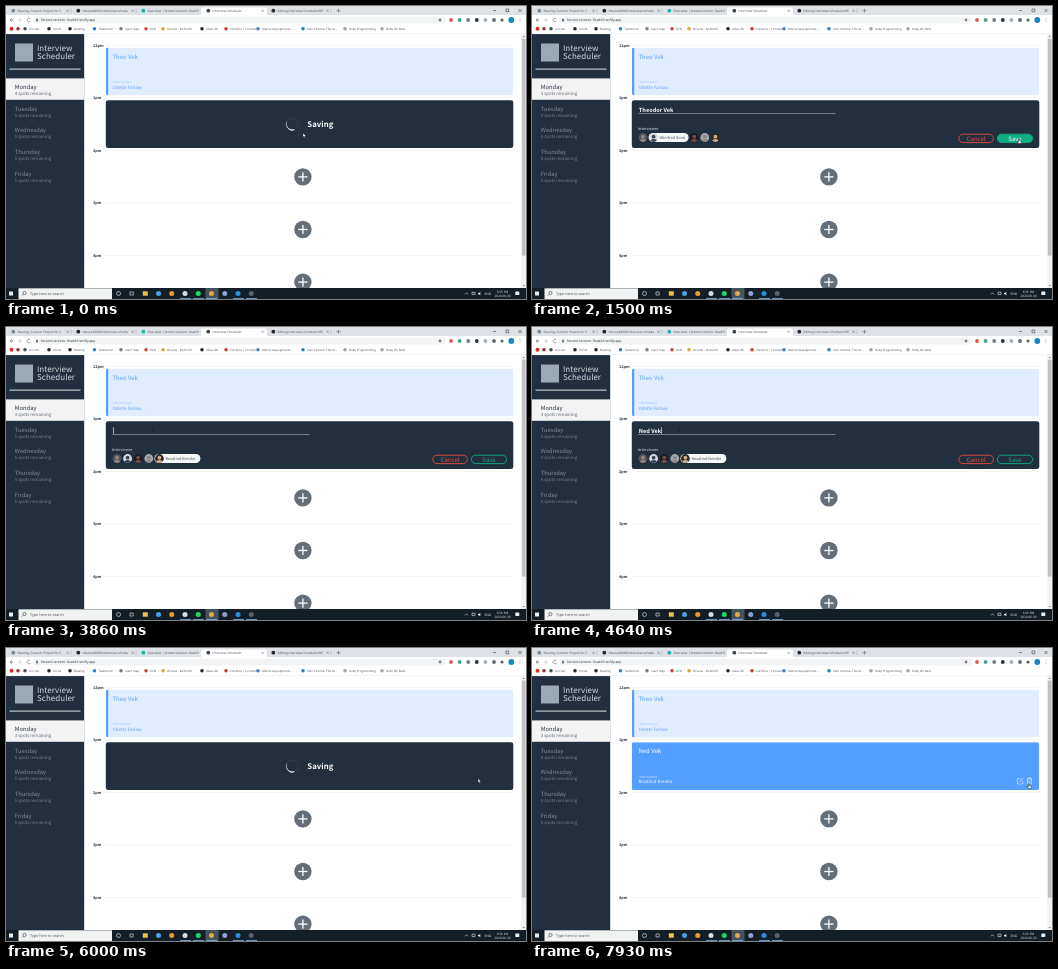
Recreate the animation shown at these times as an HTML page with a canvas. Size 520 px wide and 293 px high, loop 8000 ms.

```html
<!DOCTYPE html>
<html lang="en">
<head>
<meta charset="utf-8">
<title>Interview Scheduler</title>
<style>
html, body { margin: 0; width: 100%; height: 100%; overflow: hidden; background: #fff; }
canvas { display: block; width: 520px; height: 293px; }
</style>
</head>
<body>
<canvas id="stage"></canvas>
<script>
const W = 520, H = 293, LOOP = 8000;
const canvas = document.getElementById('stage');
const c = canvas.getContext('2d');
const dpr = window.devicePixelRatio || 1;
canvas.width = Math.round(W * dpr);
canvas.height = Math.round(H * dpr);

const APP = '"Noto Sans CJK JP", "Noto Sans CJK SC", "Noto Sans CJK", "Open Sans", sans-serif';
const UI = '"Open Sans", "Noto Sans", sans-serif';
const NAVY = '#222f3e', BLUE = '#539fff', RED = '#e74c3c', GREEN = '#10ac84';
const CARD = { x: 99.8, w: 407.5, h: 47.9, r: 2.4 };

const FIRST = 'Theo Vek', OLD = 'Theodor Vek', NEW = 'Ned Vek';
const PEOPLE = [
  { skin: '#9a8478', back: '#4d5661' },
  { skin: '#39424e', back: '#d9dde2', name: 'Winifred Soral' },
  { skin: '#7d4a42', back: '#171c24' },
  { skin: '#8d8580', back: '#a3a8ae' },
  { skin: '#cfae88', back: '#2c2926', name: 'Rosalind Brenko' }
];

// Times of the state changes, in ms
const T = { saved: 70, edit: 1500, pick: 2430, focus: 2720, erase: 2930, erased: 3500, save: 5930, done: 7070 };
const KEYS = [3930, 4140, 4290, 4360, 4430, 4500, 4570];
// Pointer path: time, x, y
const PATH = [
  [0, 297, 127], [640, 297, 127], [1000, 476, 131], [1290, 487, 133], [1680, 487, 133],
  [2340, 183, 131], [2460, 183, 131], [2710, 147, 102], [5000, 147, 102],
  [5640, 472, 130.5], [7360, 472, 130.5], [7860, 497, 136], [8000, 497, 136]
];

function rect(x, y, w, h, fill) {
  c.fillStyle = fill;
  c.fillRect(x, y, w, h);
}

function round(x, y, w, h, r, fill, stroke, lw = 0.7) {
  c.beginPath();
  c.roundRect(x, y, w, h, r);
  if (fill) { c.fillStyle = fill; c.fill(); }
  if (stroke) { c.strokeStyle = stroke; c.lineWidth = lw; c.stroke(); }
}

function dot(x, y, r, fill) {
  c.beginPath();
  c.arc(x, y, r, 0, Math.PI * 2);
  c.fillStyle = fill;
  c.fill();
}

function line(color, lw, ...p) {
  c.beginPath();
  for (let i = 0; i < p.length; i += 2) c.lineTo(p[i], p[i + 1]);
  c.strokeStyle = color;
  c.lineWidth = lw;
  c.stroke();
}

function poly(fill, stroke, ...p) {
  c.beginPath();
  for (let i = 0; i < p.length; i += 2) c.lineTo(p[i], p[i + 1]);
  c.closePath();
  c.fillStyle = fill;
  c.fill();
  if (stroke) { c.strokeStyle = stroke; c.lineWidth = 0.5; c.stroke(); }
}

// Small type is laid out large and scaled down, so its spacing is not rounded to pixels.
const ZOOM = 10;
function text(s, x, y, size, color, weight = 400, family = APP, align = 'left') {
  c.save();
  c.translate(x, y);
  c.scale(1 / ZOOM, 1 / ZOOM);
  c.font = `${weight} ${size * ZOOM}px ${family}`;
  c.textRendering = 'geometricPrecision';
  c.textAlign = align;
  c.fillStyle = color;
  c.fillText(s, 0, 0);
  const width = c.measureText(s).width / ZOOM;
  c.restore();
  return width;
}

const ui = (s, x, y, size, color) => text(s, x, y, size, color, 400, UI);

function drawBrowser() {
  rect(0, 0, W, 9, '#dee1e6');
  rect(0, 9, W, 19, '#fff');
  round(195, 1.5, 66, 9, [2, 2, 0, 0], '#fff');
  const tabs = [
    ['Bearing, Custom Project for S', '#7b8794'], ['theovek0000/interview-schedu', '#24292e'],
    ['Overview | fervent-lantern-1bad', '#20b2aa'], ['Interview Scheduler', '#3b4654'],
    ['Editing Interview-Scheduler/RE', '#24292e']
  ];
  tabs.forEach(([title, color], i) => {
    const x = 5 + i * 65;
    dot(x + 2.3, 4.7, 1.9, color);
    ui(title, x + 6.5, 5.9, 3.2, '#4a4e53');
    line('#5f6368', 0.5, x + 55.5, 3.6, x + 57.7, 5.8);
    line('#5f6368', 0.5, x + 57.7, 3.6, x + 55.5, 5.8);
    if (i !== 2 && i !== 3) line('#a5a9ae', 0.5, x + 60, 2.5, x + 60, 7);
  });
  line('#5f6368', 0.6, 330.5, 4.7, 334.5, 4.7);
  line('#5f6368', 0.6, 332.5, 2.7, 332.5, 6.7);
  line('#222', 0.5, 487, 4.5, 490, 4.5);
  c.strokeRect(500, 3, 2.8, 2.8);
  line('#222', 0.5, 512.5, 3, 515.5, 6);
  line('#222', 0.5, 515.5, 3, 512.5, 6);

  line('#5f6368', 0.6, 6, 12.2, 4, 14, 6, 15.8);
  line('#5f6368', 0.6, 4, 14, 7.5, 14);
  line('#b5b8bc', 0.6, 13.5, 12.2, 15.5, 14, 13.5, 15.8);
  line('#b5b8bc', 0.6, 12, 14, 15.5, 14);
  c.beginPath();
  c.arc(23, 14, 1.8, 0.4, 5.6);
  c.strokeStyle = '#5f6368';
  c.stroke();
  round(27, 10.6, 413, 6.8, 3.4, '#f1f3f4');
  rect(30, 13.5, 2, 1.8, '#5f6368');
  c.beginPath();
  c.arc(31, 13.5, 0.8, Math.PI, 0);
  c.stroke();
  ui('fervent-lantern-1bad4f.netlify.app', 35, 15.2, 3.45, '#303438');
  dot(434, 14, 1.4, '#7a7f85');
  ['#e2574c', '#43a389', '#6d7b88', '#2c3338', '#a8adb3', '#5b6770'].forEach((k, i) =>
    dot(445 + i * 8.6, 14, 1.9, k));
  dot(496, 14, 1.6, '#5f6368');
  dot(505.3, 14, 2.9, '#1787c0');
  for (const y of [12.4, 14, 15.6]) dot(514, y, 0.4, '#5f6368');

  dot(5.5, 22.7, 2, '#d93025');
  dot(12, 22.7, 1.8, '#9b2f36');
  const marks = [
    [19, 'visr.net', '#4a4f55'], [43, 'Forvik', '#24292e'], [64, 'Bearing', '#24292e'],
    [88.5, 'TaskVorrel', '#2f80d0'], [115, 'react map', '#7a8088'], [140, 'KVD', '#d0453e'],
    [157, 'Orvane - KodruHil', '#e2a035'], [196, 'Ideas db', '#24292e'],
    [220, 'Zundora | Connect', '#cf3b35'], [252, 'Melvornequipments...', '#4d7fc4'],
    [297, 'Velo Cinema: The Ar...', '#2b82b5'], [339, 'Ruby Programming', '#a0a5ab'],
    [376, 'Ruby On Rails', '#a0a5ab']
  ];
  for (const [x, s, k] of marks) {
    dot(x, 22.7, 1.8, k);
    ui(s, x + 4, 23.8, 3, '#4a4e53');
  }
  line('#e4e6e8', 0.5, 0, 27.7, W, 27.7);
}

function drawScrollbar() {
  rect(515.4, 28, 4.6, 254, '#f1f1f1');
  rect(515.8, 32.6, 3.8, 217, '#c1c1c1');
  poly('#606468', null, 516.7, 30.9, 518.7, 30.9, 517.7, 29.7);
  poly('#606468', null, 516.7, 279, 518.7, 279, 517.7, 280.2);
}

function drawTaskbar() {
  rect(0, 282, W, 11, '#141e27');
  rect(12.5, 282.3, 93.5, 10.7, '#f1f2f2');
  rect(3, 285.5, 4, 4, '#e8edf0');
  c.beginPath();
  c.arc(18.5, 287, 1.6, 0, 7);
  c.strokeStyle = '#333a40';
  c.lineWidth = 0.6;
  c.stroke();
  line('#333a40', 0.6, 17.3, 288.2, 16, 289.6);
  ui('Type here to search', 24, 288.8, 3.7, '#4a4f54');
  c.beginPath();
  c.arc(112.5, 287.5, 2, 0, 7);
  c.strokeStyle = '#e8edf0';
  c.stroke();
  c.strokeRect(124, 286, 3.2, 3);
  rect(199.5, 282, 13, 11, '#46525c');
  rect(136.8, 285.3, 5, 4.4, '#f0c04c');
  ['#4c9fe0', '#e89b35', '#d9dde0', '#1ed760', '#e0a84a', '#8f9fd6', '#2790e0', '#59626b'].forEach((k, i) =>
    dot(152.5 + i * 13.25, 287.5, 2.5, k));
  for (const x of [174, 187, 200, 227, 240]) rect(x, 292.2, 11, 0.8, '#76b9ed');
  line('#e8edf0', 0.6, 459, 288.3, 460.5, 286.8, 462, 288.3);
  c.strokeRect(466, 286.2, 3, 2.4);
  poly('#e8edf0', null, 472, 287, 473, 287, 474.3, 285.8, 474.3, 289.2, 473, 288.2, 472, 288.2);
  ui('ENG', 478.5, 288.7, 3.3, '#e8edf0');
  text('6:56 PM', 496.5, 286.6, 3.1, '#e8edf0', 400, UI, 'center');
  text('2020-06-30', 496.5, 291.2, 3.1, '#e8edf0', 400, UI, 'center');
  round(509.3, 285.6, 4, 3.4, 0.4, '#e8edf0');
}

function drawSidebar(spots) {
  rect(0, 28, 78.3, 254, NAVY);
  rect(78.3, 28, 0.7, 254, '#dfe2e5');
  rect(9, 37.5, 18, 18, '#9aa9b8');
  text('Interview', 31, 45.3, 8.05, '#d3d9df', 300);
  text('Scheduler', 31, 53.1, 8.05, '#d3d9df', 300);
  rect(3.5, 62.6, 71, 1, '#dfe3e7');
  rect(0, 72.4, 78.3, 21.4, '#f4f3f4');
  ['Monday', 'Tuesday', 'Wednesday', 'Thursday', 'Friday'].forEach((day, i) => {
    const y = 82.7 + i * 21.8;
    text(day, 8.8, y, 5.8, i ? '#848d98' : NAVY);
    text(`${i ? 5 : spots} spots remaining`, 8.8, y + 6, 4.4, i ? '#7a838f' : '#5d6670');
  });
}

function drawHours() {
  ['12pm', '1pm', '2pm', '3pm', '4pm'].forEach((hour, i) => {
    const y = 39.2 + i * 52.6;
    text(hour, 87, y + 1.4, 3.8, NAVY, 700);
    rect(100, y - 0.3, 407, 0.6, '#ececee');
    if (i < 2) return;
    const cy = y + 26.5;
    dot(296.9, cy, 8.7, '#636e78');
    line('#fff', 1.3, 292.3, cy, 301.5, cy);
    line('#fff', 1.3, 296.9, cy - 4.6, 296.9, cy + 4.6);
  });
}

function drawCard(y, name, person, hover) {
  const { x, w, h, r } = CARD;
  c.save();
  c.beginPath();
  c.roundRect(x, y, w, h, r);
  c.clip();
  rect(x, y, w, h, hover ? BLUE : '#e0edff');
  rect(x, y, 2.4, h, BLUE);
  c.restore();
  const ink = hover ? '#fff' : '#5ba2fb';
  text(name, 106.4, y + 11.2, 6, ink);
  text('Interviewer', 106.6, y + 35.6, 3.5, hover ? '#cfe3ff' : '#9cc6fb');
  text(person, 106.5, y + 41.2, 4.45, ink);
  if (!hover) return;
  c.lineJoin = 'round';
  line('#e9f2ff', 0.6, 488.5, 130.6, 485.4, 130.6, 485.4, 136, 490.8, 136, 490.8, 133.4);
  line('#e9f2ff', 0.8, 487.6, 133.9, 491.4, 129.9);
  line('#e9f2ff', 0.6, 494.8, 130.7, 500, 130.7);
  line('#e9f2ff', 0.6, 496.4, 130.5, 496.4, 129.7, 498.4, 129.7, 498.4, 130.5);
  line('#e9f2ff', 0.6, 495.4, 130.9, 495.6, 136, 499.2, 136, 499.4, 130.9);
  line('#e9f2ff', 0.4, 496.8, 132, 496.8, 135);
  line('#e9f2ff', 0.4, 498, 132, 498, 135);
}

function drawAvatar(x, y, p) {
  c.save();
  c.beginPath();
  c.arc(x, y, 4.4, 0, 7);
  c.clip();
  rect(x - 5, y - 5, 10, 10, p.back);
  dot(x, y - 0.8, 1.9, p.skin);
  c.beginPath();
  c.ellipse(x, y + 4.4, 3.4, 2.8, 0, 0, 7);
  c.fill();
  c.restore();
}

function button(label, x, w, color, filled) {
  round(x, 128.2, w, 8.4, 4.2, filled ? color : null, color, 0.9);
  text(label, x + w / 2, 134.6, 6, filled ? '#fff' : color, 400, APP, 'center');
}

function drawForm(value, chosen, caret, hover) {
  const end = 106.8 + text(value, 106.8, 105.6, 5.6, '#fff', 700);
  if (caret) rect(end + 0.3, 100.2, 0.6, 6.6, '#fff');
  rect(106.4, 107.3, 197, 0.6, '#aab2bb');
  text('Interviewer', 106, 124.2, 3.8, '#e3e7ea');
  let x = 106;
  PEOPLE.forEach((p, i) => {
    const w = chosen === i ? (i === 1 ? 40 : 46) : 0;
    if (w) {
      round(x, 127, w, 9, 4.5, '#f7f8f9');
      text(p.name, x + 11, 133, 3.95, '#4a5563');
    }
    drawAvatar(x + 5, 131.5, p);
    x += (w || 10) + 0.6;
  });
  button('Cancel', 426.8, 34.6, RED, false);
  button('Save', 465.4, 35.2, GREEN, hover);
}

function drawSaving(t) {
  const a = 1.3 + (t % 1000) / 1000 * Math.PI * 2;
  c.lineCap = 'round';
  for (let i = 0; i < 12; i++) {
    c.beginPath();
    c.arc(286.3, 118, 6, a + i * 0.19, a + (i + 1) * 0.19);
    c.strokeStyle = `rgba(255,255,255,${0.9 - i * 0.05})`;
    c.lineWidth = 1.2 - i * 0.05;
    c.stroke();
  }
  c.lineCap = 'butt';
  c.beginPath();
  c.arc(286.3, 118, 6, 0, 7);
  c.strokeStyle = 'rgba(255,255,255,0.13)';
  c.lineWidth = 0.6;
  c.stroke();
  text('Saving', 301.3, 120.9, 7.8, '#fff', 700);
}

function pointerAt(t) {
  let i = 1;
  while (i < PATH.length - 1 && PATH[i][0] < t) i++;
  const [t0, x0, y0] = PATH[i - 1], [t1, x1, y1] = PATH[i];
  const u = Math.min(1, Math.max(0, (t - t0) / (t1 - t0)));
  const k = u * u * (3 - 2 * u);
  return [x0 + (x1 - x0) * k, y0 + (y1 - y0) * k];
}

function drawPointer(x, y, kind) {
  c.save();
  c.translate(x, y);
  if (kind === 'beam') {
    line('#0b1017', 0.5, 0, -2.5, 0, 2.5);
  } else if (kind === 'hand') {
    poly('#fff', '#222', -0.5, 0, 0.5, 0, 0.6, 1.8, 2.4, 2.3, 2.2, 4.6, -0.7, 4.6, -1.8, 2.7, -0.5, 2.9);
  } else {
    poly('#fff', '#222', 0, 0, 0, 4.2, 1, 3.3, 1.7, 4.8, 2.4, 4.5, 1.8, 3, 3, 3);
  }
  c.restore();
}

function typed(t) {
  if (t < T.erase) return OLD;
  if (t < T.erased) {
    const gone = Math.floor((t - T.erase) / (T.erased - T.erase) * OLD.length) + 1;
    return OLD.slice(0, Math.max(0, OLD.length - gone));
  }
  return NEW.slice(0, KEYS.filter(k => k <= t).length);
}

function draw(t) {
  c.setTransform(dpr, 0, 0, dpr, 0, 0);
  rect(0, 0, W, H, '#fff');
  drawSidebar(t < T.saved ? 4 : 3);
  drawHours();
  drawCard(41.6, FIRST, 'Odette Farlow', false);

  const [x, y] = pointerAt(t);
  const inside = (l, r) => x >= l && x <= r && y >= 127 && y <= 137;
  const editing = t >= T.edit && t < T.save;
  const saving = t < T.saved || (t >= T.save && t < T.done);
  let kind = 'arrow';

  if (editing || saving) round(CARD.x, 94.2, CARD.w, CARD.h, CARD.r, NAVY);
  if (saving) {
    drawSaving(t < T.saved ? t : t - 6000);
  } else if (editing) {
    const caret = t >= T.focus && t < 5790 && (t < 4790 || (t - 4790) % 1060 >= 530);
    const hover = inside(465, 501);
    drawForm(typed(t), t < T.pick ? 1 : 4, caret, hover);
    if (hover || inside(106, 196)) kind = 'hand';
    else if (x < 303 && y < 108) kind = 'beam';
  } else {
    const done = t >= T.done;
    drawCard(94.2, done ? NEW : OLD, PEOPLE[done ? 4 : 1].name, true);
    if (inside(484, 501)) kind = 'hand';
  }

  drawScrollbar();
  drawBrowser();
  drawTaskbar();
  drawPointer(x, y, kind);
}

const start = performance.now();
function tick() {
  draw((performance.now() - start) % LOOP);
  requestAnimationFrame(tick);
}
draw(0);
requestAnimationFrame(tick);
</script>
</body>
</html>
```
